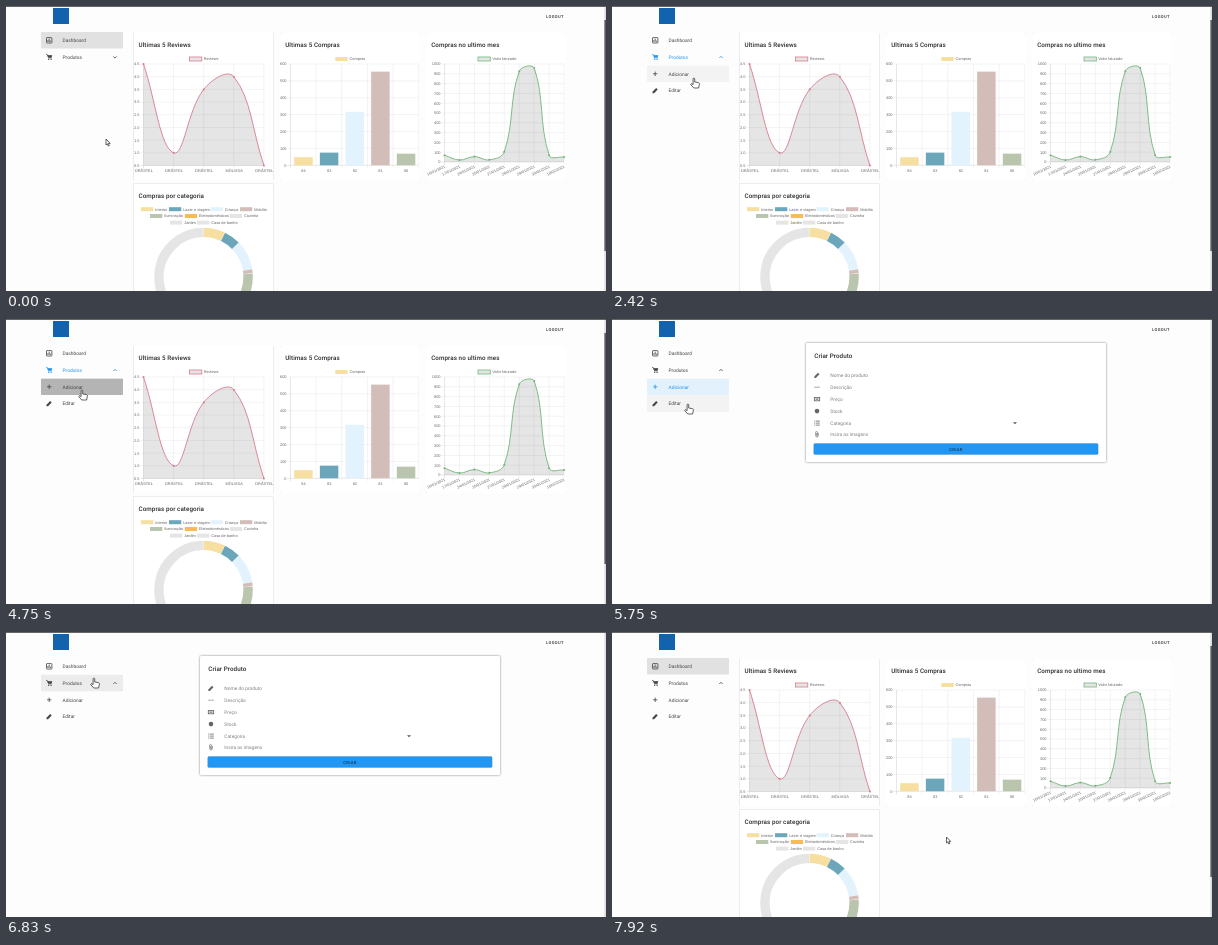
An HTML page that plays this animation: 600 px wide and 285 px high, repeating every 8000 ms.

```html
<!DOCTYPE html>
<html lang="pt">
<head>
<meta charset="utf-8">
<title>Dashboard</title>
<style>
html, body { margin: 0; width: 100%; height: 100%; overflow: hidden; background: #fdfdfd; }
svg { display: block; width: 600px; height: 285px; text-rendering: geometricPrecision; }
text { font-family: Roboto, sans-serif; fill: #333; }
.title { font-size: 6.25px; font-weight: 500; letter-spacing: .07px; fill: #2c2c2c; }
.item { font-size: 4.85px; }
.field { font-size: 4.85px; fill: #808080; }
.tick { font: 3.9px "Liberation Sans", Arial, sans-serif; fill: #666; }
.caps { font-size: 4.1px; font-weight: 500; letter-spacing: .37px; }
.card { fill: #fff; filter: drop-shadow(0 .5px .6px rgba(0,0,0,.36)); }
.form { fill: #fff; filter: drop-shadow(0 .8px 1px rgba(0,0,0,.5)); }
.grid { stroke: #e7e7e7; stroke-width: .5; fill: none; }
.axis { stroke: #cfcfcf; stroke-width: .5; }
.icon { fill: none; stroke: currentColor; stroke-width: .8; }
.icon .solid { fill: currentColor; stroke: none; }
</style>
</head>
<body>
<svg id="stage" viewBox="0 0 600 285"></svg>
<script>
const LOOP = 8000, FPS = 12;
const BLUE = '#2196f3';
const COLORS = ['#f6dfa0', '#6ba6ba', '#e3f3fd', '#d3bdb9', '#b9c6ad', '#f9bb55', '#e5e5e5'];
const stage = document.getElementById('stage');
const $ = id => document.getElementById(id);
const clamp = v => Math.max(0, Math.min(1, v));
const easeOut = p => 1 - (1 - clamp(p)) ** 4;
const range = n => [...Array(n).keys()];

// Markup helpers
const text = (x, y, s, cls, extra = '') => `<text x="${x}" y="${y}" class="${cls}" ${extra}>${s}</text>`;
const rect = (x, y, w, h, extra) => `<rect x="${x}" y="${y}" width="${w}" height="${h}" ${extra}/>`;
const line = (x1, y1, x2, y2, cls = 'grid') => `<path class="${cls}" d="M${x1} ${y1}L${x2} ${y2}"/>`;
const group = (id, body) => `<g id="${id}">${body}</g>`;
const icon = (x, y, body, color = '#555') =>
  `<g class="icon" transform="translate(${x} ${y})" style="color:${color}">${body}</g>`;
const key = (x, y, color, label, border = 'none') =>
  rect(x, y - 2, 12.3, 4, `fill="${color}" stroke="${border}" stroke-width=".8"`) +
  text(x + 14.2, y + 1.4, label, 'tick');

const PENCIL = '<path class="solid" d="M-2.7 2.7V1.2L1 -2.5L2.5 -1L-1.2 2.7Z"/>';
const ICONS = {
  chart: '<rect x="-2.7" y="-2.7" width="5.4" height="5.4" rx=".5"/><path d="M-1.3 1.6V-.3M0 1.6V-1.6M1.3 1.6V.4"/>',
  cart: '<path d="M-3 -2.6H-2L-.7 .7H2.2M-1.5 -1.4H2.7L1.7 .7"/><path class="solid" d="M-1.6 -1.5H2.7L1.8 .5H-.8Z"/><circle cx="-.5" cy="2.2" r=".7" class="solid"/><circle cx="1.9" cy="2.2" r=".7" class="solid"/>',
  plus: '<path d="M-2.2 0H2.2M0 -2.2V2.2"/>',
  pencil: PENCIL,
  dots: '<path stroke-dasharray="1.3 .6" d="M-2.6 0H2.6"/>',
  cash: '<rect x="-2.7" y="-1.7" width="5.4" height="3.4"/><circle r=".9" class="solid"/><path d="M-1.9 -1.5V1.5M1.9 -1.5V1.5" stroke-width=".5"/>',
  dot: '<circle r="2.3" class="solid"/>',
  list: '<path d="M-1.3 -2H2.8M-1.3 0H2.8M-1.3 2H2.8"/><path d="M-2.8 -2H-2M-2.8 0H-2M-2.8 2H-2"/>',
  clip: '<path stroke-width=".6" d="M1.4 -1.3V1.5A1.4 1.4 0 0 1 -1.4 1.5V-1.7A.95 .95 0 0 1 .5 -1.7V1.2A.45 .45 0 0 1 -.5 1.2V-1.2"/>'
};

// Side menu
const ROWS = [['Dashboard', 'chart'], ['Produtos', 'cart'], ['Adicionar', 'plus'], ['Editar', 'pencil']];
const rowTop = i => 26 + 16.75 * i;
const menuRow = ([label, name], i) => {
  const y = rowTop(i) + 8.3;
  return group('row' + i,
    rect(35, rowTop(i), 82, 16.5, `id="bg${i}" rx=".8"`) +
    icon(43.2, y, ICONS[name], 'inherit') +
    text(56.5, y + 1.7, label, 'item', 'style="fill:currentColor"') +
    (i === 1 ? `<g class="icon" id="chevron"><path d="M-1.7 -.8L0 .9L1.7 -.8"/></g>` : ''));
};
const menu = ROWS.slice(0, 2).map(menuRow).join('') +
  '<clipPath id="fold"><rect id="foldBox" x="30" y="59.3" width="90" height="0"/></clipPath>' +
  `<g clip-path="url(#fold)">${ROWS.slice(2).map((r, i) => menuRow(r, i + 2)).join('')}</g>`;

// Charts
const end = 'text-anchor="end"', mid = 'text-anchor="middle"';
const yAxis = (x, right, top, bottom, labels) => labels.map((s, i) => {
  const y = top + (bottom - top) * i / (labels.length - 1);
  return line(x - 3, y, right, y, i === labels.length - 1 ? 'axis' : 'grid') + text(x - 4, y + 1.4, s, 'tick', end);
}).join('');
const xLines = (xs, top, bottom) =>
  xs.map((x, i) => line(x, top, x, bottom, i ? 'grid' : 'axis')).join('');

const reviews = {
  id: 'reviews', color: '#d77c8b', top: 58, base: 159.5,
  pts: [4.5, 1, 3.5, 4, .5].map((v, i) => [137.5 + 30.1 * i, 159.5 - (v - .5) * 25.375])
};
const sales = {
  id: 'sales', color: '#72b67a', top: 58, base: 156,
  pts: [70, 20, 55, 22, 105, 925, 960, 70, 50].map((v, i) => [438.5 + 14.95 * i, 156 - v * .098])
};
const lineMarks = c => `<path id="${c.id}Fill" fill="rgba(0,0,0,.1)"/>` +
  `<path id="${c.id}Line" fill="none" stroke="${c.color}" stroke-width=".9"/>` +
  c.pts.map((p, i) => `<circle id="${c.id}${i}" cx="${p[0]}" r="1" fill="${c.color}"/>`).join('');

const reviewChart = yAxis(137.5, 258, 58, 159.5, range(9).map(i => (4.5 - i / 2).toFixed(1))) +
  xLines(reviews.pts.map(p => p[0]), 58, 162.5) +
  ['DRÅSTEL', 'DRÅSTEL', 'DRÅSTEL', 'MÖLVIDA', 'DRÅSTEL'].map((s, i) =>
    text(137.9 + 30.1 * i, 166, s, 'tick', mid)).join('') +
  key(183.5, 53, '#e5e5e5', 'Reviews', reviews.color) + lineMarks(reviews);

const DATES = ['10/01', '17/01', '24/01', '25/01', '27/01', '28/01', '29/01', '30/01', '10/02'];
const salesChart = yAxis(438.5, 558, 58, 156, range(11).map(i => 1000 - 100 * i)) +
  xLines(sales.pts.map(p => p[0]), 58, 159) +
  DATES.map((d, i) => {
    const x = 439.5 + 14.95 * i;
    return text(x, 161.5, d + '/2021', 'tick', `${end} transform="rotate(-25 ${x} 161.5)"`);
  }).join('') +
  key(472, 53, '#e5e5e5', 'Valor faturado', sales.color) + lineMarks(sales);

const BARS = [48, 75, 317, 555, 69], BAR_W = 25.65;
const barChart = yAxis(284.5, 412.8, 58, 159.3, range(7).map(i => 600 - 100 * i)) +
  xLines(range(6).map(i => 284.5 + BAR_W * i), 58, 162.3) +
  BARS.map((v, i) => rect(288.2 + BAR_W * i, 0, 18.5, 0, `id="bar${i}" fill="${COLORS[i]}"`) +
    text(297.5 + BAR_W * i, 165.5, 84 - i, 'tick', mid)).join('') +
  key(329.3, 53, COLORS[0], 'Compras');

const emptyChart = x => yAxis(x, x + 129, 51, 163.5, range(11).map(i => i < 10 ? (1 - i / 10).toFixed(1) : '0')) +
  line(x, 51, x, 166, 'axis');

const ARCS = [0, 26, 46, 81, 86, 150, 185, 360];
const RADIUS = 44.6;
const LEGEND = [
  [135, 203.2, 0, 'Interior'], [163, 203.2, 1, 'Lazer e viagem'], [204.5, 203.2, 2, 'Criança'], [234, 203.2, 3, 'Mobília'],
  [144, 210, 4, 'Iluminação'], [178.8, 210, 5, 'Eletrodomésticos'], [223.8, 210, 6, 'Cozinha'],
  [164, 216.6, 6, 'Jardim'], [191, 216.6, 6, 'Casa de banho']
];
const donut = LEGEND.map(([x, y, c, s]) => key(x, y, COLORS[c], s)).join('') +
  COLORS.map((c, i) => `<circle id="arc${i}" cx="197.5" cy="271" r="${RADIUS}" fill="none" stroke="${c}" stroke-width="9.4" pathLength="360" transform="rotate(-90 197.5 271)"/>`).join('');

const card = (x, y, h, title) => rect(x, y, 140, h, 'class="card" rx="1"') + text(x + 5.2, y + 14.3, title, 'title');
const dashboard = card(127.3, 27, 147, 'Ultimas 5 Reviews') + card(274, 27, 147, 'Ultimas 5 Compras') +
  card(420, 27, 147, 'Compras no ultimo mes') + card(127.3, 177.3, 130, 'Compras por categoria') +
  group('bars', barChart) + group('empty', emptyChart(138) + emptyChart(431)) +
  group('loaded', reviewChart + salesChart + donut) +
  rect(598.4, 14, 1.6, 231, 'fill="#5c5c5c"');

const FIELDS = [['Nome do produto', 'pencil', 56.2], ['Descrição', 'dots', 68.2], ['Preço', 'cash', 80.1],
  ['Stock', 'dot', 92.1], ['Categoria', 'list', 104.1], ['Insira as imagens', 'clip', 115.1]];
const form = rect(194, 24, 300, 119, 'class="form" rx="1.2"') + text(202.3, 39.2, 'Criar Produto', 'title') +
  FIELDS.map(([s, name, y]) => icon(205, y, ICONS[name], '#666') + text(218.3, y + 1.7, s, 'field')).join('') +
  '<path d="M401 103.3h4l-2 2z" fill="#555"/>' +
  rect(201.7, 124.6, 284.5, 10.8, `fill="${BLUE}" rx="1.2" style="filter:drop-shadow(0 .4px .4px rgba(0,0,0,.4))"`) +
  text(344, 131.5, 'CRIAR', 'caps', mid + ' style="fill:#173a57"');

const HAND = 'M-.9 .8C-.9 -.2 .7 -.2 .7 .8V4L4.3 4.6C5.2 4.8 5.5 5.3 5.4 6.1L4.6 10H-.2L-3.1 6.8C-3.6 6 -2.5 5.3 -1.9 5.9L-.9 6.7Z';
const ARROW = 'M0 0V6L1.4 4.8L2.3 7L3.3 6.6L2.4 4.4H4.2Z';

stage.innerHTML = rect(0, 0, 600, 285, 'fill="#fdfdfd"') +
  rect(598.4, 0, 1.6, 285, 'fill="#dcdcdc"') +
  rect(0, 0, 600, .9, 'fill="#555"') +
  rect(47, 2, 16, 16, 'fill="#1263ae"') +
  text(540, 12.2, 'LOGOUT', 'caps') + menu +
  group('dashboard', dashboard) + group('form', form) +
  '<path id="cursor" fill="#fff" stroke="#222" stroke-width=".7" stroke-linejoin="round"/>';

// Pointer hot spot: time, x, y
const PATH = [[0, 100, 133], [170, 100, 133], [500, 62, 96], [670, 62, 96], [1000, 75, 49], [1420, 76, 49],
  [1580, 82, 72], [2420, 82, 72], [3170, 78, 70], [3500, 80, 49], [4000, 80, 49], [4250, 76, 71], [4920, 76, 71],
  [5160, 78, 84], [5250, 76, 85], [5500, 76, 84], [5740, 76, 85], [5900, 76, 85], [6330, 87, 47], [6500, 88, 46],
  [6830, 88, 46], [7080, 81, 31], [7440, 81, 31], [7900, 334.5, 205], [LOOP, 334.5, 205]];

function pointer(t) {
  const i = PATH.findIndex(p => p[0] > t), [t0, x0, y0] = PATH[i - 1], [t1, x1, y1] = PATH[i];
  const p = (t - t0) / (t1 - t0), k = p * p * (3 - 2 * p);
  return [x0 + (x1 - x0) * k, y0 + (y1 - y0) * k];
}

// Cubic spline with tension .4, handles kept inside the plot
function spline(pts, top, base) {
  const cap = y => Math.max(top, Math.min(base, y));
  const handles = pts.map((c, i) => {
    const a = pts[i - 1] || c, b = pts[i + 1] || c;
    const da = Math.hypot(c[0] - a[0], c[1] - a[1]), db = Math.hypot(b[0] - c[0], b[1] - c[1]);
    const fa = .4 * da / (da + db), fb = .4 * db / (da + db), dx = b[0] - a[0], dy = b[1] - a[1];
    return [c[0] - fa * dx, cap(c[1] - fa * dy), c[0] + fb * dx, cap(c[1] + fb * dy)];
  });
  return 'M' + pts[0] + pts.slice(1).map((p, i) =>
    `C${handles[i].slice(2)} ${handles[i + 1].slice(0, 2)} ${p}`).join('');
}

function drawLine({ id, pts, top, base }, p) {
  const now = pts.map(([x, y]) => [x, base + (y - base) * p]);
  const d = spline(now, top, base);
  $(id + 'Line').setAttribute('d', d);
  $(id + 'Fill').setAttribute('d', `${d}V${base}H${pts[0][0]}Z`);
  now.forEach((q, i) => $(id + i).setAttribute('cy', q[1]));
}

const show = (id, on) => $(id).style.display = on ? '' : 'none';

function drawMenu(t, hover) {
  const home = t < 1080 || t > 7070, adding = t > 4990 && t < 6400;
  const pressed = clamp((t - 4550) / 160);
  const shade = 243 - 63 * pressed;
  const fill = i => {
    if (i === 0 && home) return '#e1e1e1';
    if (i === 2 && adding) return '#e3f1fc';
    if (i === 2 && t > 4550 && t < 4990) return `rgb(${shade},${shade},${shade})`;
    if (i !== hover) return 'none';
    return i === 1 && t > 6400 ? '#ececec' : '#f3f3f3';
  };
  const blue = i => i === 1 ? t > 1080 && t < 4990 : i === 2 && adding;
  ROWS.forEach((_, i) => {
    $('bg' + i).setAttribute('fill', fill(i));
    $('row' + i).style.color = blue(i) ? BLUE : '#444';
  });
  const open = easeOut((t - 1080) / 340);
  $('foldBox').setAttribute('height', 34.5 * open);
  $('chevron').setAttribute('transform', `translate(109 51.2) rotate(${-180 * open})`);
}

function drawCharts(t) {
  const grow = (start, span) => t < 5000 ? 1 : easeOut((t - start) / span);
  const loaded = t < 5000 || t > 7410, p = grow(7390, 500), bar = grow(7323, 590);
  show('bars', t < 5000 || t > 7320);
  show('loaded', loaded);
  show('empty', !loaded);
  BARS.forEach((v, i) => {
    const h = v * .1688 * bar;
    $('bar' + i).setAttribute('y', 159.3 - h);
    $('bar' + i).setAttribute('height', h);
  });
  drawLine(reviews, p);
  drawLine(sales, p);
  COLORS.forEach((_, i) => {
    const arc = $('arc' + i);
    arc.setAttribute('stroke-dasharray', `${Math.max(0, (ARCS[i + 1] - ARCS[i]) * p - .4)} 360`);
    arc.setAttribute('stroke-dashoffset', -ARCS[i] * p);
  });
}

function draw(ms) {
  const t = Math.floor(ms % LOOP * FPS / 1000) * 1000 / FPS;
  const [x, y] = pointer(t);
  const row = x > 35 && x < 117 && y > 26 ? Math.floor((y - 26) / 16.75) : -1;
  const hover = row < (t > 1400 ? 4 : 2) ? row : -1;
  const home = t < 4990 || t > 7150;
  show('dashboard', home);
  show('form', !home);
  drawMenu(t, hover);
  if (home) drawCharts(t);
  $('cursor').setAttribute('d', hover < 0 ? ARROW : HAND);
  $('cursor').setAttribute('transform', `translate(${x} ${y})`);
}

const start = performance.now();
function tick() {
  draw(performance.now() - start);
  requestAnimationFrame(tick);
}
tick();
</script>
</body>
</html>
```
